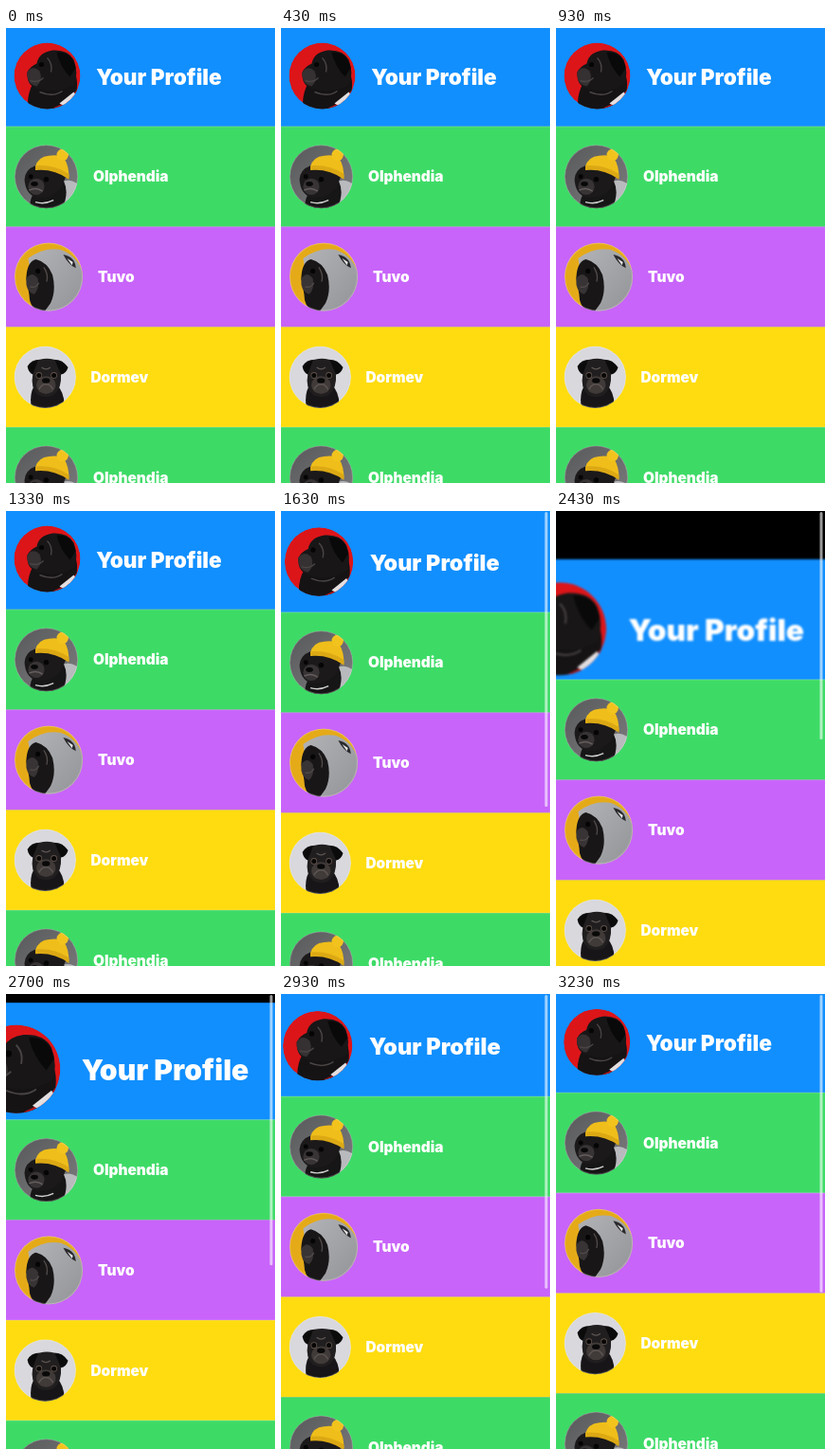
Animation, 284 px wide and 480 px high, one loop 3.3 s. Source, as an HTML page:

```html
<!DOCTYPE html>
<html lang="en">
<head>
<meta charset="utf-8">
<title>Stretchy list header</title>
<style>
  html, body { margin: 0; width: 100%; height: 100%; overflow: hidden; background: #000; }
  svg { display: block; width: 284px; height: 480px; }
  text { fill: #fff; font: 900 15.4px Inter, "Open Sans", sans-serif; }
  .title { font-size: 22.6px; text-anchor: middle; }
  .rim { fill: none; stroke: #fff; stroke-opacity: .25; }
</style>
</head>
<body>
<svg viewBox="0 0 284 480">
  <defs>
    <clipPath id="round"><circle r="35"/></clipPath>
    <linearGradient id="studio" x2="1" y2="1">
      <stop offset="0" stop-color="#58595b"/><stop offset="1" stop-color="#7c7c7e"/>
    </linearGradient>
    <linearGradient id="hood" x2="1" y2="1">
      <stop offset="0" stop-color="#b2b3b7"/><stop offset="1" stop-color="#929397"/>
    </linearGradient>

    <!-- Avatars share a 35 unit radius around the origin -->
    <g id="redDog" clip-path="url(#round)">
      <circle r="35" fill="#dc1519"/>
      <path d="M-15 8Q-22 20-20 36H12L31 16Q33 4 28-6Z" fill="#151314"/>
      <path d="M-21-4Q-18-10-11-13Q-9-25 6-27Q22-28 28-17Q33-4 29 9Q10 20-8 14Q-22 12-21-4Z" fill="#181617"/>
      <path d="M-21-4Q-15-12-8-5Q-4 4-11 11Q-22 9-21-4Z" fill="#353031"/>
      <path d="M10-25Q27-26 30-8L24 1Q14-9 10-25Z" fill="#09090a"/>
      <circle cx="-6" cy="-12" r="2.6" fill="#050505"/>
      <path d="M-18 5Q-10 8-4 2M0-19Q6-13 4-4M-8 17Q6 23 16 16" fill="none" stroke="#4a4444" stroke-width="1.4"/>
      <path d="M6 34Q22 28 31 15L34 19L16 36Z" fill="#b4171c"/>
      <path d="M13 29L28 17L30 20L18 32Z" fill="#e4dfe0"/>
    </g>

    <g id="hatDog" clip-path="url(#round)">
      <circle r="35" fill="url(#studio)"/>
      <path d="M16 6Q27 1 37 10V37H12Z" fill="#b9babd"/>
      <path d="M-18 37Q-19 24-12 16L19 4Q26 18 17 37Z" fill="#171617"/>
      <path d="M-12-12Q-23-8-24 3Q-23 19-11 23Q5 25 16 13L23-3Z" fill="#1b191a"/>
      <ellipse cx="-11" cy="11" rx="9" ry="9" fill="#383435"/>
      <ellipse cx="-13" cy="8" rx="4" ry="2.6" fill="#080808"/>
      <path d="M-19 15Q-11 11-4 16" fill="none" stroke="#655e5d" stroke-width="1.4"/>
      <circle cx="-17" cy="0" r="2.6" fill="#050505"/>
      <circle cx="0" cy="3" r="2.8" fill="#050505"/>
      <path d="M-12-11Q-9-22 3-23Q14-25 20-20Q25-12 25 1Q8-10-12-8Z" fill="#efbe1a"/>
      <path d="M-12-12Q8-14 25-3L25 3Q8-9-12-7Z" fill="#dca914"/>
      <circle cx="18" cy="-24" r="6.5" fill="#f2c31d"/>
      <path d="M-12 28Q-2 31 8 26" fill="none" stroke="#d0d0d1" stroke-width="1.5"/>
    </g>

    <g id="hoodDog" clip-path="url(#round)">
      <circle r="35" fill="#e5aa18"/>
      <path d="M-21-19Q-5-31 12-28Q32-21 36 0V37H-16Q-6 18-18 0Z" fill="url(#hood)"/>
      <path d="M-23 1Q-22-16-13-18Q-1-15 4-2Q8 14 2 27L-6 38Q-20 33-20 18Z" fill="#181617"/>
      <path d="M-23 2Q-17-7-11 2Q-9 13-15 18Q-24 15-23 2Z" fill="#383334"/>
      <circle cx="-11" cy="-6" r="2.5" fill="#050505"/>
      <path d="M-19 10Q-13 12-10 6M-5-10Q0-3-2 5" fill="none" stroke="#514a4a" stroke-width="1.3"/>
      <path d="M15-23Q27-21 28-9Q20-13 15-23Z" fill="#29292c"/>
      <path d="M19-19L25-15L24-12Z" fill="#e6e6e6"/>
    </g>

    <g id="frontDog" clip-path="url(#round)">
      <circle r="35" fill="#d8d8dd"/>
      <path d="M-15 38Q-19 18-11 8H13Q24 20 21 38Z" fill="#171517"/>
      <path d="M-20-12Q-16-20-6-20Q2-22 10-20Q21-20 25-11L18-3Q19 13 10 20Q1 25-8 20Q-17 12-14-3Z" fill="#211e1f"/>
      <path d="M-20-12Q-15-19-8-19L-14-3Q-19-5-20-12ZM26-11Q20-19 11-19L18-3Q24-4 26-11Z" fill="#0c0b0c"/>
      <ellipse cx="1" cy="9" rx="11" ry="10" fill="#403a39"/>
      <ellipse cx="1" cy="4" rx="4.5" ry="3" fill="#0a0909"/>
      <path d="M-7 14Q-4 8 1 8Q6 8 9 14M-4-11Q1-7 6-11" fill="none" stroke="#5c5553" stroke-width="1.4"/>
      <g fill="#60524b"><circle cx="-7" cy="-2" r="3.6"/><circle cx="10" cy="-2" r="3.6"/></g>
      <g fill="#070606"><circle cx="-7" cy="-2" r="2.7"/><circle cx="10" cy="-2" r="2.7"/></g>
    </g>
  </defs>

  <rect width="284" height="480"/>
  <g id="header">
    <rect x="-10" y="-1.9" width="304" height="105.8" fill="#118fff"/>
    <use href="#redDog" x="43.5" y="50.5"/>
    <text class="title" x="161.5" y="59.5">Your Profile</text>
  </g>
  <g id="rows"></g>
  <rect id="bar" x="278.5" y="1" width="3" rx="1.5" fill="#fff"/>
</svg>
<script>
  const LOOP = 3300, ROW = 105.75, TOP = 103.8, RELEASE = 2500;
  const $ = id => document.getElementById(id);
  const header = $('header'), rows = $('rows'), bar = $('bar');

  const green = { fill: '#3ddb66', dog: 'hatDog', cx: 42.5, r: 33.5, x: 92, name: 'Olphendia' };
  const list = [
    green,
    { fill: '#c864fa', dog: 'hoodDog', cx: 45, r: 36, x: 97, name: 'Tuvo' },
    { fill: '#ffdc10', dog: 'frontDog', cx: 41.3, r: 32.6, x: 89.5, name: 'Dormev' },
    green
  ];
  rows.innerHTML = list.map((p, i) => `
    <g transform="translate(0 ${TOP + i * ROW})">
      <rect width="284" height="${ROW + 0.3}" fill="${p.fill}"/>
      <rect y="-.4" width="284" height="1" fill="#fff" opacity=".25"/>
      <g transform="translate(${p.cx} 53) scale(${p.r / 35})">
        <use href="#${p.dog}"/><circle class="rim" r="34.6"/>
      </g>
      <text x="${p.x}" y="58.6">${p.name}</text>
    </g>`).join('');

  // Drag path: time, distance, speed
  const drag = [[1500, 0, 0], [1630, 3, .035], [2030, 22, .075], [2430, 74, .13], [RELEASE, 80, 0]];

  function pullAt(t) {
    if (t <= drag[0][0]) return 0;
    if (t >= RELEASE) {
      const k = (t - RELEASE) * 0.0109;
      return 80 * (1 + k) * Math.exp(-k);
    }
    const i = drag.findIndex(d => d[0] > t);
    const [t0, y0, v0] = drag[i - 1], [t1, y1, v1] = drag[i];
    const h = t1 - t0, u = (t - t0) / h, w = 1 - u;
    return w * w * ((1 + 2 * u) * y0 + u * h * v0) + u * u * ((3 - 2 * u) * y1 - w * h * v1);
  }

  // The picture advances on an alternating 30 / 70 ms beat
  function beat(t) {
    const base = Math.floor(t / 100) * 100;
    return base && t - base >= 30 ? base + 30 : base;
  }

  function draw(now) {
    const t = beat(now % LOOP);
    const pull = pullAt(t);
    const scale = 1 + Math.min(0.4, pull * 0.0116);
    header.setAttribute('transform', `translate(142 ${51 + pull}) scale(${scale}) translate(-142 -51)`);
    header.style.filter = pull > 1 ? `blur(${pull * 0.01}px)` : 'none';
    rows.setAttribute('transform', `translate(0 ${pull})`);
    bar.setAttribute('height', 314 - pull);
    bar.setAttribute('opacity', 0.6 * Math.min(1, Math.max(0, (t - 1480) / 100)));
    requestAnimationFrame(() => draw(performance.now()));
  }
  draw(performance.now());
</script>
</body>
</html>
```
